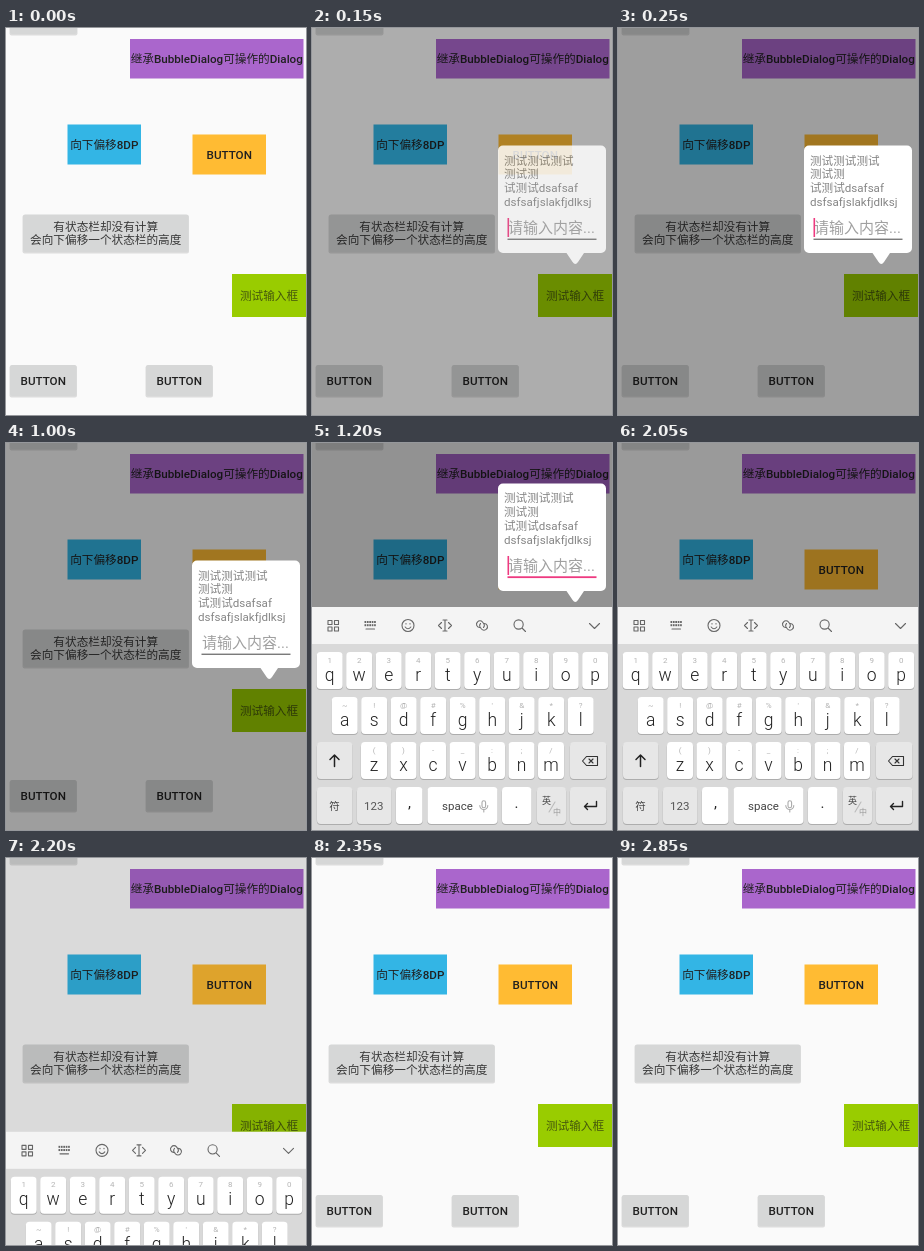
Animation, 300 px wide and 387 px high, one loop 3.3 s. Source, as an HTML page:

```html
<!DOCTYPE html>
<html lang="zh">
<head>
<meta charset="utf-8">
<title>Bubble dialog</title>
<style>
html, body { margin: 0; width: 100%; height: 100%; overflow: hidden; background: #fafafa; }
svg { display: block; width: 100%; height: 100%; }
text { font-family: Roboto, "Noto Sans CJK SC", "Noto Sans CJK", sans-serif; font-size: 11.6px; }
.mid { text-anchor: middle; }
.icon { fill: none; stroke-linecap: round; stroke-linejoin: round; }
</style>
</head>
<body>
<svg id="stage" viewBox="0 0 300 387" xmlns="http://www.w3.org/2000/svg">
  <rect width="300" height="387" fill="#fafafa"/>
  <g id="page"></g>
  <rect id="dim" width="300" height="387" opacity="0"/>
  <g id="dialog">
    <path d="M191 117.5H289a5 5 0 0 1 5 5V220a5 5 0 0 1-5 5H272L266 234q-2.700 4-5.400 0L254.500 225H191a5 5 0 0 1-5-5V122.500a5 5 0 0 1 5-5z" fill="#fff"/>
    <g id="message" fill="#858585"></g>
    <text x="196" y="205" fill="#a0a0a0" style="font-size:15px">请输入内容...</text>
    <rect id="line" x="195.500" width="89"/>
    <rect id="caret" x="195.500" y="190" width="1.600" height="19" fill="#ee3a80"/>
  </g>
  <g id="keyboard"></g>
</svg>
<script>
const NS = "http://www.w3.org/2000/svg";
const LOOP = 3300, STEP = 50, KB_HEIGHT = 223;
const $ = id => document.getElementById(id);

function add(parent, tag, attrs, label) {
  const el = document.createElementNS(NS, tag);
  for (const k in attrs) el.setAttribute(k, attrs[k]);
  if (label) el.textContent = label;
  parent.appendChild(el);
  return el;
}

function label(parent, str, x, y, size, fill, weight = 400) {
  add(parent, "text", { x, y, fill, class: "mid", style: `font-size:${size}px;font-weight:${weight}` }, str);
}

function block(x, y, w, h, fill, lines, ink = "#202020", weight = 500) {
  add($("page"), "rect", { x, y, width: w, height: h, rx: fill === "#d6d7d7" ? 2 : 0, fill });
  lines.forEach((s, i) =>
    label($("page"), s, x + w / 2, y + h / 2 + 4.3 + (i - (lines.length - 1) / 2) * 13.6, 11.65, ink, weight));
}

function grayButton(x, y, w, h, lines, ink, weight) {
  add($("page"), "rect", { x: x - .5, y: y + .5, width: w + 1, height: h + 1, rx: 2, fill: "#000", opacity: .12 });
  block(x, y, w, h, "#d6d7d7", lines, ink, weight);
}

function buildPage() {
  grayButton(4, -25, 67, 31, []);
  block(124, 11, 173.500, 39.500, "#aa66cc", ["继承BubbleDialog可操作的Dialog"]);
  block(61.500, 96.500, 73.500, 40, "#33b5e5", ["向下偏移8DP"]);
  block(186.500, 106.500, 73.500, 40, "#ffbb33", ["BUTTON"]);
  grayButton(17, 186.500, 165.500, 37.500, ["有状态栏却没有计算", "会向下偏移一个状态栏的高度"], "#383838", 400);
  block(226, 246, 74, 43, "#99cc00", ["测试输入框"], "#46580c", 400);
  grayButton(4, 337, 66.500, 31, ["BUTTON"]);
  grayButton(140, 337, 66.500, 31, ["BUTTON"]);
}

function buildMessage() {
  ["测试测试测试", "测试测", "试测试dsafsaf", "dsfsafjslakfjdlksj"].forEach((s, i) =>
    add($("message"), "text", { x: 192, y: 136.5 + i * 13.8 }, s));
}

function key(x, y, w, fill = "#fff") {
  const kb = $("keyboard");
  add(kb, "rect", { x: x - .2, y: y + 1, width: w + .4, height: 37, rx: 4, fill: "#adadad" });
  add(kb, "rect", { x, y, width: w, height: 37, rx: 4, fill });
}

function letters(chars, hints, x, y) {
  [...chars].forEach((c, i) => {
    const cx = x + i * 29.5;
    key(cx - 13, y, 26);
    label($("keyboard"), hints[i], cx, y + 10.5, 8, "#b4b4b4");
    label($("keyboard"), c, cx, y + 28.5, 17.5, "#222", 300);
  });
}

function icon(d, stroke = "#666", width = 1.1) {
  add($("keyboard"), "path", { d, class: "icon", stroke, "stroke-width": width });
}

function buildKeyboard() {
  const kb = $("keyboard"), fn = "#e7e7e7", ink = "#222";
  add(kb, "rect", { y: 164, width: 300, height: KB_HEIGHT, fill: "#d9d9d9" });
  add(kb, "rect", { y: 164, width: 300, height: 37, fill: "#f4f4f4" });

  for (const x of [16, 22.5]) for (const y of [177.5, 184])
    icon(`M${x} ${y}h4v4h-4z`);
  for (let r = 0; r < 2; r++) for (let c = 0; c < 5; c++)
    add(kb, "rect", { x: 52.5 + c * 2.4, y: 178 + r * 3.2, width: 1.7, height: 2, fill: "#666" });
  icon("M54 186h8.500");
  icon("M90 182.500a6 6 0 1 0 12 0a6 6 0 1 0-12 0M93.200 184q2.800 3.600 5.600 0M94 180.500v.4M98 180.500v.4");
  icon("M131 177h4M133 177v11M131 188h4M129.500 179.500l-3 3 3 3M136.500 179.500l3 3-3 3");
  icon("M167.500 184.500a3.200 3.200 0 0 1-2-5.500a3.200 3.200 0 0 1 5 0l1.500 2a3 3 0 0 1-.5 3.500M172.500 180.500a3.200 3.200 0 0 1 2 5.500a3.200 3.200 0 0 1-5 0l-1.500-2a3 3 0 0 1 .5-3.500");
  icon("M202 181.500a4.600 4.600 0 1 0 9.200 0a4.600 4.600 0 1 0-9.200 0M210 185l3.500 3.500");
  icon("M277.500 180.500l5 5 5-5");

  letters("qwertyuiop", "1234567890", 17.7, 209);
  letters("asdfghjkl", "~!@#%'&*?", 32.7, 254);
  letters("zxcvbnm", "()-_:;/", 62, 299);

  key(5, 299, 35.5, fn);
  icon("M22.500 323.500v-11.500M18 316.500l4.500-4.500 4.500 4.500", ink, 1.5);
  key(258, 299, 36.5, fn);
  icon("M270.500 318l4-4.500h11v9h-11zM277 316l4 4M281 316l-4 4", "#333");

  key(5, 344, 35.5, fn);
  label(kb, "符", 22.5, 366.5, 10.5, "#444");
  key(45, 344, 34.5, fn);
  label(kb, "123", 61.7, 367, 11.5, "#555");
  key(84, 344, 26.5);
  label(kb, ",", 97.5, 365, 15, ink);
  key(115.500, 344, 70);
  label(kb, "space", 145.5, 366.5, 11.5, "#444");
  icon("M170 359.500a1.800 1.800 0 0 1 3.600 0v3.500a1.800 1.800 0 0 1-3.600 0zM167.800 362.500a4 4 0 0 0 8 0M171.800 366.500v2.500", "#aaa");
  key(190, 344, 29.5);
  label(kb, ".", 204.5, 365, 15, ink);
  key(225, 344, 29, fn);
  label(kb, "英", 234.5, 361, 9, "#444");
  label(kb, "中", 245, 372, 8, "#999");
  icon("M237 369l6-10", "#bbb");
  key(258, 344, 36.5, fn);
  icon("M284.500 358.500v5h-12M275.500 360.500l-3 3 3 3", ink, 1.4);
}

const ramp = (t, start, length) => Math.min(1, Math.max(0, (t - start) / length));
const easeOut = (p, n) => 1 - (1 - p) ** n;
const smooth = p => p * p * (3 - 2 * p);

function draw(ms) {
  const t = Math.floor(ms / STEP) * STEP;
  const shown = easeOut(ramp(t, 0, 250), 2);
  const typing = t >= 1050;

  const shade = (.37 * shown + .05 * ramp(t, 1000, 200)) * (1 - ramp(t, 2030, 245));
  $("dim").setAttribute("opacity", shade);

  const lift = 88.7 * easeOut(ramp(t, 1050, 450), 5);
  $("dialog").setAttribute("transform", `translate(0 ${-lift})`);
  $("dialog").setAttribute("opacity", t < 2050 ? shown : 0);

  $("line").setAttribute("y", typing ? 210.3 : 210.7);
  $("line").setAttribute("height", typing ? 1.8 : 1);
  $("line").setAttribute("fill", typing ? "#ee3a80" : "#444");
  const caretOn = (t >= 50 && t < 550) || (typing && t < 1550);
  $("caret").setAttribute("opacity", caretOn ? 1 : 0);

  const up = easeOut(ramp(t, 1000, 200), 2) - smooth(ramp(t, 2050, 303));
  $("keyboard").setAttribute("transform", `translate(0 ${KB_HEIGHT * (1 - up)})`);
  $("keyboard").setAttribute("visibility", up > 0 ? "visible" : "hidden");
}

buildPage();
buildMessage();
buildKeyboard();

const begin = performance.now();
function tick() {
  draw((performance.now() - begin) % LOOP);
  requestAnimationFrame(tick);
}
draw(0);
requestAnimationFrame(tick);
</script>
</body>
</html>
```
